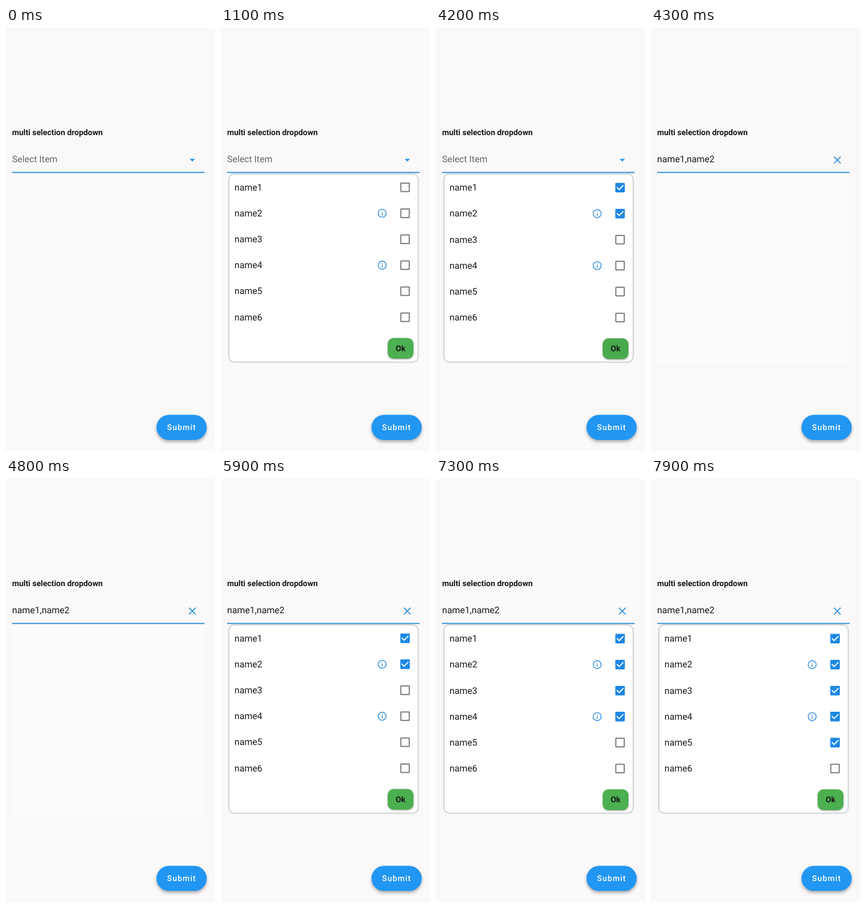
An HTML page for the animation above (8 s loop, 341 px wide and 687 px high).

```html
<!DOCTYPE html>
<html lang="en">
<head>
<meta charset="utf-8">
<title>Multi selection dropdown</title>
<style>
  html, body { margin: 0; width: 100%; height: 100%; overflow: hidden; background: #faf8f9; }
  svg { display: block; width: 100%; height: 100%; }
  text { font-family: Roboto, sans-serif; font-size: 14.8px; fill: #191919; text-rendering: geometricPrecision; }
  .small { font-size: 13px; font-weight: 700; }
  .hint { fill: #666; }
  .submit { font-weight: 500; fill: #fff; letter-spacing: 1.04px; }
  .card { fill: #fff; filter: drop-shadow(0 0 1px #8f9ca0) drop-shadow(0 0 1.2px #b4c0c2); }
  .raised { filter: drop-shadow(0 1.5px 1.5px rgba(0, 0, 0, .38)); }
  .fab { fill: #2196f3; filter: drop-shadow(0 3px 2.5px rgba(0, 0, 0, .32)); }
  .info { fill: none; stroke: #3a8fdc; stroke-width: 1.45; }
  .box { fill: none; stroke: #757575; stroke-width: 1.75; }
  .box.on { fill: #1e88e5; stroke: #1e88e5; }
  .tick { fill: none; stroke: #fff; stroke-width: 1.75; }
</style>
</head>
<body>
<svg viewBox="0 0 341 687" preserveAspectRatio="xMinYMin meet">
  <rect width="341" height="687" fill="#faf8f9"/>
  <rect id="cleared" x="9" y="236" width="315" height="310" fill="#fbfbfb"/>
  <text class="small" x="10" y="174">multi selection dropdown</text>
  <text id="value" x="10" y="218"></text>
  <path id="arrow" d="M299.7 212.6h8.7l-4.35 4.4z" fill="#2196f3"/>
  <path id="clear" d="M298.6 209.2l10.8 10.8m0-10.8l-10.8 10.8" fill="none" stroke="#2a90e2" stroke-width="1.7"/>
  <rect x="10" y="233.7" width="314" height="1.8" fill="#2d90d8"/>
  <g id="panel">
    <rect class="card" x="13.5" y="237.5" width="307.5" height="304.5" rx="8.5"/>
    <g id="content">
      <g id="rows"></g>
      <rect id="ok" class="raised" x="272" y="504" width="42" height="33.7" rx="9.5"/>
      <text class="small" x="293" y="525.2" text-anchor="middle">Ok</text>
    </g>
  </g>
  <rect class="fab" x="245.5" y="628.3" width="82" height="40.7" rx="20.35"/>
  <text class="small submit" x="262.8" y="653.2">Submit</text>
</svg>
<script>
const LOOP = 8000, STEP = 100, ROW_PITCH = 42.2;
const FILL_TIMES = [2200, 3100, 6800, 7200, 7800, Infinity];
const INFO_ROWS = [1, 3];
const OPEN = 1100, PRESS = 4200, CLOSE = 4300, REOPEN = 5900;

const $ = id => document.getElementById(id);
const show = (el, on) => { el.style.display = on ? '' : 'none'; };

const infoIcon = `<g class="info"><circle cx="263" cy="0" r="6.5"/>
  <path d="M263 -3.6v1.45M263 -.7v4.3"/></g>`;

$('rows').innerHTML = FILL_TIMES.map((_, i) => `
  <g transform="translate(0 ${259.3 + i * ROW_PITCH})">
    <text x="22" y="4.9">name${i + 1}</text>
    ${INFO_ROWS.includes(i) ? infoIcon : ''}
    <rect class="box" x="293.4" y="-6.9" width="13.8" height="13.8" rx=".6"/>
    <path class="tick" d="M294.9 -.8l3.9 3.9l7 -7"/>
  </g>`).join('');

const boxes = document.querySelectorAll('.box');
const ticks = document.querySelectorAll('.tick');

function render(t) {
  const open = (t >= OPEN && t < CLOSE) || t >= REOPEN;
  const chosen = t >= CLOSE;
  show($('panel'), open);
  show($('cleared'), chosen && !open);
  show($('arrow'), !chosen);
  show($('clear'), chosen);
  $('value').textContent = chosen ? 'name1,name2' : 'Select Item';
  $('value').classList.toggle('hint', !chosen);

  // the list settles half a pixel lower just after it opens
  const settling = t < OPEN + STEP || (t >= REOPEN && t < REOPEN + STEP);
  $('content').setAttribute('transform', `translate(0 ${settling ? -0.6 : 0})`);
  $('ok').setAttribute('fill', t >= PRESS && t < CLOSE ? '#49aa4d' : '#4caf50');

  // a box fills first, its tick follows one step later
  FILL_TIMES.forEach((time, i) => {
    boxes[i].classList.toggle('on', t >= time);
    show(ticks[i], t >= time + STEP);
  });
}

const start = performance.now();
function frame() {
  const t = (performance.now() - start) % LOOP;
  render(Math.floor(t / STEP) * STEP);
  requestAnimationFrame(frame);
}
frame();
</script>
</body>
</html>
```
